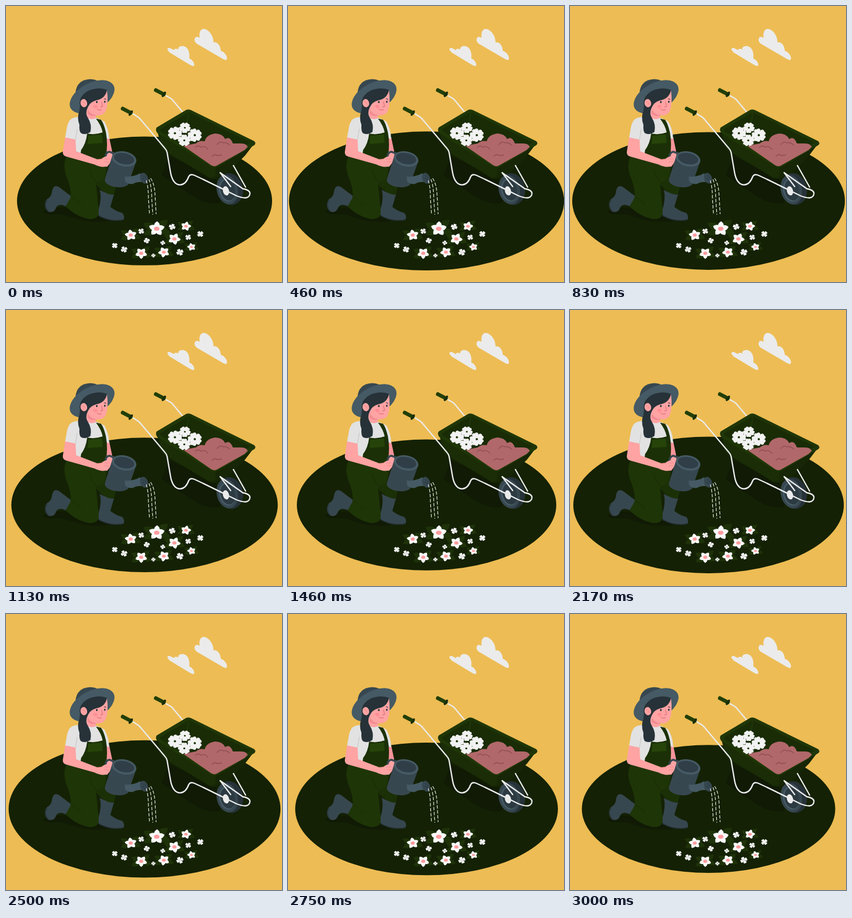
These frames come from a looping animation (500x500 px, 3.04 s). An HTML page:

```html
<!DOCTYPE html>
<html lang="en">
<head>
<meta charset="utf-8">
<title>Gardening</title>
<style>
  html, body { margin: 0; width: 100%; height: 100%; overflow: hidden; background: #edbc54; }
  svg { display: block; width: 100vw; height: 100vh; }
  .line { fill: none; stroke-linecap: round; stroke-linejoin: round; }
</style>
</head>
<body>
<svg viewBox="0 0 500 500">
  <rect width="500" height="500" fill="#edbc54"/>
  <ellipse id="ground" cx="251" cy="353.2" rx="231" ry="117" fill="#142105"/>

  <g id="clouds" fill="#ebebeb">
    <path d="M342 64C340 56 346 54 351 58C349 49 352 41 359 41.500C368 43 376 54 376 66C383 64 389 72 389 81C397 84 402 92 400 97Q398 99 393 96L345 68Z"/>
    <path d="M293 80C291 76 295 75 299 77L304 80C305 77 309 77 312 79C311 73 319 71 325 74C332 78 333 88 332 95C338 97 342 104 341 108Q339 110 334 107L296 84Z"/>
  </g>

  <g id="shadows" fill="#101a04">
    <path d="M296 272L282 306Q312 328 338 344Q360 359 384 358L398 345L376 308Z"/>
    <path d="M66 373Q84 362 112 366L166 374L214 383Q210 391 190 389Q162 394 128 386Q100 374 80 378Z"/>
  </g>

  <g id="barrow">
    <path class="line" d="M287 161L298 167Q301 169 304 173L320 192" stroke="#ebebeb" stroke-width="2.4"/>
    <g transform="rotate(-14 404 331)">
      <ellipse cx="406" cy="332" rx="23" ry="29" fill="#263238"/>
      <ellipse cx="400.500" cy="332" rx="19" ry="27" fill="#37474f"/>
      <ellipse cx="400" cy="333" rx="14.500" ry="21" fill="#455a64"/>
      <ellipse cx="401.500" cy="333" rx="13" ry="19" fill="#2c3a42"/>
    </g>
    <ellipse cx="398.500" cy="335" rx="5.500" ry="8.500" transform="rotate(-16 398 335)" fill="#ebebeb"/>
    <path d="M275 229L281 254Q282 259 287 262L363 308Q374 317 382 311L403 301L433 271L449 250L380 288Z" fill="#162606"/>
    <path d="M275 229L281 254Q282 259 287 262L363 308Q372 315 379 308L381 288Z" fill="#1a2d06"/>
    <path d="M273 220L326 188.500Q330 186.500 335 188.500L449 244.500Q454 248 450 252L384 291Q377 294 370 290L274 230Q270 224 273 220Z" fill="#1f3607"/>
    <path d="M280 223L328 194Q331 192 335 194L443 247L379 286Q376 287 372 285L280 227Q278 225 280 223Z" fill="#192c06"/>
    <path class="line" d="M331 194L328 213" stroke="#294a0c" stroke-width=".8"/>
    <path d="M322 254L328 252L344 249Q350 243 360 245Q363 233 379 231Q392 231 397 241Q406 235 411 249L426 249Q435 249 438 255L432 261L382 289Q377 292 371 288Z" fill="#b1686a"/>
    <path class="line" d="M343 256Q349 251 353 256Q360 252 366 260M382 251Q388 244 393 248Q399 246 405 252M373 272Q379 267 383 271L391 270" stroke="#8d4c51" stroke-width="1.3"/>
    <g id="cargo"></g>
    <g class="line" stroke="#ebebeb" stroke-width="2.4">
      <path d="M228 194L239 201Q242 203 245 207L288 258Q291 261 292 266L298 301Q302 324 316 324Q326 323 331 309Q334 303 342 307L357 314L418 344Q441 353 442 339Q441 333 429 331L388 302M412 289L434 328"/>
      <path d="M388 302L407 327M357 314L400 335"/>
    </g>
    <g class="line" stroke="#213f08" stroke-width="7">
      <path d="M211.500 186L226 193.500M271.500 152.500L286 160"/>
      <path d="M224 197L228 191M284 163L288 157" stroke="#182d07" stroke-width="4"/>
    </g>
  </g>

  <g id="gardener">
    <path d="M170 333Q182 341 196 340L189 364Q199 372 211 375Q217 384 211 388Q188 392 168 379Q165 377 167 370Q174 350 170 333Z" fill="#37474f"/>
    <path d="M168 380Q190 392 213 387" class="line" stroke="#263238" stroke-width="1.500"/>
    <path d="M155 292L184 284L181 312L202 319L195 342Q182 341 174 334L160 320Z" fill="#1b3006"/>
    <path d="M120 346L96 328Q85 322 83 338Q82 346 74 350Q67 362 76 372Q86 376 90 367Q94 356 109 363Z" fill="#37474f"/>
    <path class="line" d="M74 352Q68 363 77 372" stroke="#2d3b43" stroke-width="2"/>
    <path d="M110 272Q102 287 109 308Q119 332 117 347L108 363Q126 381 150 386Q169 387 168 371L163 320L177 314L184 282L178 264Z" fill="#1e3507"/>
    <path class="line" d="M163 318Q155 308 152 298M118 346Q129 350 136 360" stroke="#182b06" stroke-width="1"/>
    <path d="M173 240L187 238L192 262L193 274L178 276Z" fill="#f8949a"/>
    <path d="M125 202Q113 203 110 222L107 239L126 243L124 263L140 270L180 260L182 240L187 241Q186 222 178 209L165 203L142 198Z" fill="#e2e2e2"/>
    <path class="line" d="M126 242L129 223" stroke="#c4c4c4" stroke-width="1"/>
    <path d="M147 231Q145 249 136 261L134 276L181 274Q185 250 181 229Q177 212 172 206L163 204Q173 217 175 229Q161 234 147 231Z" fill="#1b3006"/>
    <path d="M149 235L174 233L175 248L148 250Z" fill="#26440a"/>
    <path d="M107 238L103 264Q102 271 110 273L160 287Q174 294 184 290L193 277Q195 266 188 264Q181 265 180 276L166 278L127 263L126 242Z" fill="#ffa3a3"/>
    <path class="line" d="M166 278Q174 278 179 274M174 288L184 281" stroke="#e8838b" stroke-width="1"/>

    <path d="M126 157Q128 134 152 132.500Q168 133 171 142L146 169Z" fill="#37474f"/>
    <ellipse cx="156" cy="164.500" rx="44" ry="25" transform="rotate(-28 156 164.500)" fill="#455a64"/>
    <path d="M146 177L145 201Q154 208 163 203L163 198Q176 200 181 190Q186 176 183 153L157 158Z" fill="#ffa3a3"/>
    <path d="M148 188Q154 197 164 198Q155 202 148 195Z" fill="#f28b93"/>
    <path d="M134 180Q131 163 150 153Q169 146 183 152Q180 168 163 171Q152 174 148 184Q143 194 148 202Q156 214 153 228Q145 234 137 231Q132 229 133 215Q128 202 133 190Z" fill="#263238"/>
    <ellipse cx="141" cy="176" rx="6" ry="7.500" transform="rotate(-12 141 176)" fill="#ffa3a3"/>
    <path class="line" d="M138 174Q142 173 143 178" stroke="#e8838b" stroke-width="1"/>
    <g fill="#263238"><ellipse cx="164.500" cy="174" rx="1.500" ry="2"/><ellipse cx="179" cy="173.500" rx="1.300" ry="2"/></g>
    <path class="line" d="M161 169Q164 166 167 167M178 168L181 169" stroke="#263238" stroke-width="1.200"/>
    <path class="line" d="M173 174L175 182L171 183M165 187Q169 190 173 188" stroke="#d95f6d" stroke-width="1"/>
    <ellipse cx="162" cy="182" rx="4" ry="3" fill="#ff8f97"/>
  </g>

  <g id="can">
    <path class="line" d="M183 290Q176 266 187 264L196 267" stroke="#37474f" stroke-width="3.500"/>
    <path d="M193 270L179 314Q178 322 193 327Q212 331 221 324L236 281Z" fill="#37474f"/>
    <path d="M215 309Q231 310 243 303L252 319Q236 318 231 322Q222 324 216 318Z" fill="#455a64"/>
    <ellipse cx="214" cy="277" rx="22.500" ry="13.500" transform="rotate(12 214 277)" fill="#455a64"/>
    <ellipse cx="214" cy="276.500" rx="18.500" ry="10" transform="rotate(12 214 276.500)" fill="#303e47"/>
    <ellipse cx="250" cy="312" rx="7" ry="10" transform="rotate(-20 250 312)" fill="#37474f"/>
    <g fill="#22303a"><circle cx="250" cy="308" r="1"/><circle cx="253" cy="311" r="1"/><circle cx="249" cy="313" r="1"/><circle cx="252" cy="316" r="1"/></g>
    <path d="M174 276Q183 269 189 276Q191 284 183 291L171 290Z" fill="#ffa3a3"/>
    <path class="line" d="M179 277L187 277M179 282L187 282" stroke="#e8838b" stroke-width=".8"/>
  </g>

  <path id="water" d="M254 316Q258 328 258 348L260 378M259 314Q264 328 264 348L266 378M262 312Q269 322 270 342L272 377" fill="none" stroke="#f1f1e7" stroke-width="1.200" stroke-dasharray="6 3"/>
  <g id="bed"></g>
</svg>
<script>
const LOOP = 3040;
const ground = document.getElementById('ground');

// A unit petal pointing up: narrow at the heart, broad and rounded at the tip
const PETAL = 'M0 0C-.3 -.2 -.62 -.75 -.34 -.94Q-.15 -1.05 0 -.92Q.15 -1.05 .34 -.94C.62 -.75 .3 -.2 0 0';
const STAR_PETAL = 'M-.12 0C-.5 -.4 -.42 -.75 0 -1.05C.42 -.75 .5 -.4 .12 0Z';
const petals = (count, size, turn, color, shape) =>
  Array.from({ length: count }, (_, i) =>
    `<path d="${shape}" fill="${color}" transform="rotate(${turn + i * 360 / count}) scale(${size})"/>`
  ).join('');
const place = (x, y, inner) => `<g transform="translate(${x} ${y}) scale(1 .92)">${inner}</g>`;

// Cut flowers lying in the tray
document.getElementById('cargo').innerHTML =
  [[306, 230.5, 13], [324, 220.5, 10.5], [342, 234, 13], [323, 243.5, 11.5]].map(([x, y, r], i) =>
    place(x, y, petals(5, r, 20 + i * 17, '#f2f2f2', PETAL) + `<circle r="${r * .16}" fill="#213a0c"/>`)
  ).join('');

// Flower bed: blossoms with leaves, then small four-petal flowers
const blossoms = [[226, 415, 10.5], [273, 403.5, 14], [326, 399, 9], [305, 422, 11],
  [245, 448, 10.5], [286, 446, 10], [336, 436.5, 7.5]];
const small = [[245, 408, 5], [197, 434, 5], [214, 441, 5.5], [255, 425, 5], [267, 452, 3.5],
  [284, 429, 4], [301, 400, 5.5], [330, 419, 5], [352, 413, 5.5], [315, 446, 6]];
const leaf = (r, turn) =>
  `<path d="M0 0Q${r * .9} ${-r * 1.1} ${r * 1.9} 0Q${r * .9} ${r * .9} 0 0" fill="#1e3209" transform="rotate(${turn})"/>`;
document.getElementById('bed').innerHTML =
  blossoms.map(([x, y, r]) => place(x, y, [-40, 20, 155, 205].map(a => leaf(r, a)).join(''))).join('') +
  blossoms.map(([x, y, r], i) => place(x, y,
    petals(5, r, i * 11 - 8, '#fafafa', STAR_PETAL) + `<ellipse rx="${r * .36}" ry="${r * .3}" fill="#ff9da0"/>`)).join('') +
  small.map(([x, y, r], i) => place(x, y, petals(4, r * 1.1, 35 + i * 13, '#f5f5f5', PETAL))).join('');

// Ground radius over time: [ms, rx], joined by a smooth periodic curve
const pulse = [[0, 231], [460, 249.2], [580, 252], [830, 247], [1080, 242.3], [1460, 235],
  [1660, 232.5], [2170, 245], [2330, 251.5], [2500, 246.3], [2710, 239.5], [3000, 229.5]];
function knot(i) {
  const n = pulse.length, turns = Math.floor(i / n);
  const [t, r] = pulse[i - turns * n];
  return [t + turns * LOOP, r];
}
function slope(i) {
  const [t0, r0] = knot(i - 1), [t1, r1] = knot(i), [t2, r2] = knot(i + 1);
  const a = (r1 - r0) / (t1 - t0), b = (r2 - r1) / (t2 - t1);
  return a * b <= 0 ? 0 : 2 * a * b / (a + b);
}
function radius(t) {
  let i = pulse.length - 1;
  while (pulse[i][0] > t) i--;
  const [t0, r0] = knot(i), [t1, r1] = knot(i + 1);
  const d = t1 - t0, u = (t - t0) / d, v = 1 - u;
  return r0 * v * v * (1 + 2 * u) + r1 * u * u * (3 - 2 * u) +
    d * u * v * (slope(i) * v - slope(i + 1) * u);
}

const start = performance.now();
function draw(now) {
  const rx = radius(Math.max(0, now - start) % LOOP);
  ground.setAttribute('rx', rx);
  ground.setAttribute('ry', rx * .505);
  requestAnimationFrame(draw);
}
draw(start);
</script>
</body>
</html>
```
